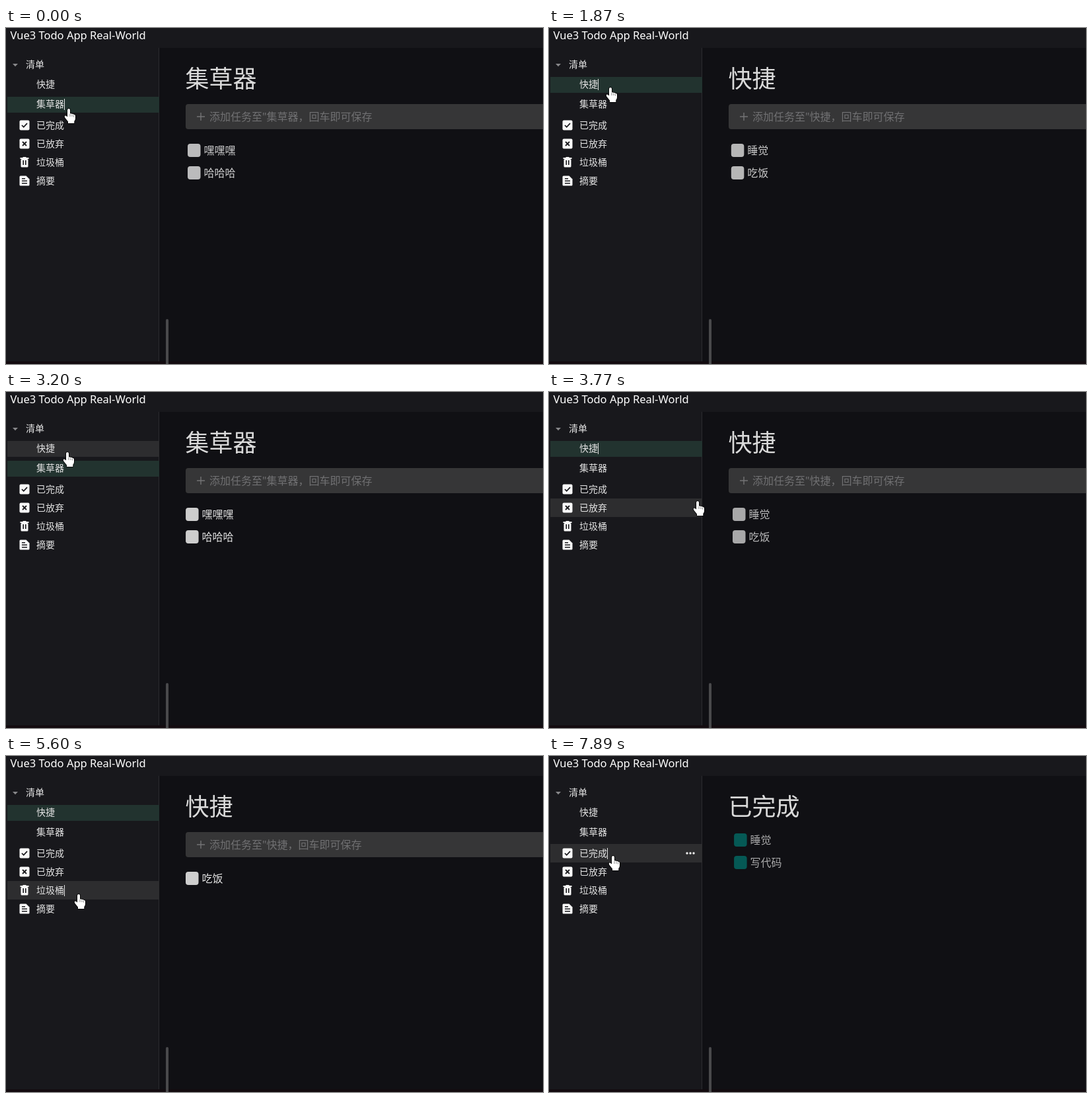
An HTML page with a canvas that plays this animation: 813x508 px, repeating every 8000 ms.

```html
<!DOCTYPE html>
<html lang="zh">
<head>
<meta charset="utf-8">
<title>Todo</title>
<style>
  html, body { margin: 0; width: 100%; height: 100%; overflow: hidden; background: #101014; }
  canvas { display: block; width: 813px; height: 508px; }
</style>
</head>
<body>
<canvas id="stage" width="813" height="508"></canvas>
<script>
const ctx = document.getElementById('stage').getContext('2d');
const FONT = '"Noto Sans", "Noto Sans CJK SC", "Noto Sans CJK", sans-serif';
const LOOP = 8000;
const REFRESH = 141.5, PHASE = 75;
const BLINK = 460;
const LOAD = 120;        // from a click to the new view
const TICKED = 4200;     // the first task is checked off

const lists = [
  { name: '快捷', tasks: ['睡觉', '吃饭'], input: true },
  { name: '集草器', tasks: ['嘿嘿嘿', '哈哈哈'], input: true }
].map((row, i) => ({ ...row, y: 85 + 30 * i, top: 74 + 30 * i, h: 24 }));

const tools = [
  { name: '已完成', tasks: ['睡觉', '写代码'], done: true, icon: checkIcon },
  { name: '已放弃', tasks: [], icon: crossIcon },
  { name: '垃圾桶', tasks: ['我是被删除的 task'], icon: binIcon },
  { name: '摘要', tasks: [], icon: noteIcon }
].map((row, i) => ({ ...row, y: 147 + 28 * i, top: 133 + 28 * i, h: 28 }));

const rows = [...lists, ...tools];
const [quick, inbox] = lists;
const [finished, , bin] = tools;

const clicks = [
  [-336, inbox], [1460, quick], [2502, inbox], [3484, quick], [5500, bin], [7616, finished]
];

// Resting places of the pointer: x, y, arrival, departure
const stops = [
  [95, 122, 0, 75], [93, 90, 700, 2490], [92, 115, 2615, 2900],
  [93, 85, 3300, 3600], [225, 165, 3750, 3770], [284, 182, 4060, 4300],
  [110, 209, 5020, 5900], [97, 184, 6300, 6900], [97, 151, 7500, LOOP]
];

const clamp = v => Math.max(0, Math.min(1, v));
const ease = p => p * p * (3 - 2 * p);
const lastClick = t => clicks.findLastIndex(c => c[0] <= t);

function pointer(t) {
  const i = stops.findLastIndex(s => s[2] <= t);
  const a = stops[i], b = stops[i + 1] || a;
  const p = b === a ? 0 : ease(clamp((t - a[3]) / (b[2] - a[3])));
  return [0, 1].map(k => Math.round(a[k] + (b[k] - a[k]) * p));
}

function currentView(t) {
  const i = lastClick(t - LOAD);
  const age = t - LOAD - clicks[i][0];
  const previous = clicks[i - 1]?.[1];
  const row = clicks[i][1];
  // The highlight leaves the old row before it reaches the new one
  const selected = age < 60 ? previous : age < 140 ? null : row;
  return { row, age, selected };
}

function rect(x, y, w, h, color, r = 0) {
  ctx.fillStyle = color;
  ctx.beginPath();
  ctx.roundRect(x, y, w, h, r);
  ctx.fill();
}

function text(str, x, midY, size, color, weight = 500) {
  ctx.font = `${weight} ${size}px ${FONT}`;
  ctx.fillStyle = color;
  ctx.fillText(str, x, Math.round(midY + size * 0.38));
}

function shape(d, fill) {
  ctx.fillStyle = fill;
  ctx.fill(new Path2D(d));
}

function line(d, color, width) {
  ctx.strokeStyle = color;
  ctx.lineWidth = width;
  ctx.stroke(new Path2D(d));
}

function at(x, y, draw) {
  ctx.save();
  ctx.translate(x, y);
  draw();
  ctx.restore();
}

const INK = '#18181c', WHITE = '#f8f8f8';

function checkIcon() {
  rect(-7.5, -7.5, 15, 15, WHITE, 2);
  line('M-4 0 L-1.3 2.8 L4 -2.8', INK, 1.8);
}

function crossIcon() {
  rect(-7.5, -7.5, 15, 15, WHITE, 2);
  line('M-3 -3 L3 3 M3 -3 L-3 3', INK, 1.8);
}

function binIcon() {
  shape('M-6.5 -7 H-3 L-2 -8 H2 L3 -7 H6.5 V-5 H-6.5 Z', WHITE);
  rect(-5.5, -5, 11, 12.5, WHITE, 1.5);
  line('M-1.8 -3 V4 M1.8 -3 V4', INK, 1.6);
}

function noteIcon() {
  shape('M-6 -7.5 H2.5 L7.5 -2.5 V6 Q7.5 7.5 6 7.5 H-6 Q-7.5 7.5 -7.5 6 V-6 Q-7.5 -7.5 -6 -7.5 Z', WHITE);
  line('M-4 -3.2 H1 M-4 0.3 H4 M-4 3.8 H4', INK, 1.6);
}

function sidebar(t, view) {
  const [x, y] = pointer(t);
  shape('M10 54 H18 L14 58.3 Z', '#88888b');
  text('清单', 30, 55, 14, '#e4e4e4');
  for (const row of rows) {
    const hovered = x < 232 && y >= row.top && y < row.top + row.h;
    if (row === view.selected) rect(2, row.top, 230, row.h, '#22332f');
    else if (hovered) rect(2, row.top, 230, row.h, '#2d2d2f');
    if (row.icon) at(28, row.y, row.icon);
    text(row.name, 46, row.y, 14, '#e4e4e4');
    if (row.icon && row === view.row)
      for (let k = 0; k < 3; k++) rect(207.3 + k * 5, row.y - 1.7, 3.4, 3.4, '#f0f0f0', 1.7);
  }
}

function caret(t) {
  const [since, row] = clicks[lastClick(t)];
  if (Math.floor((t - since) / BLINK) % 2 === 0)
    rect(46 + 14 * row.name.length, row.y - 8, 1, 17, '#e4e4e4');
}

function task(name, x, y, alpha, done) {
  ctx.globalAlpha = alpha;
  rect(x, y - 10, 19.5, 20, done ? '#01756e' : '#cecece', 4);
  text(name, x + 24.5, y, 16, '#e2e2e2');
  ctx.globalAlpha = 1;
}

function content(t, { row, age }) {
  text(row.name, 271.5, 76, 36, '#dadada', 400);
  if (row.input) {
    rect(272, 115, 560, 38, '#363637', 4);
    line('M289 134 H301 M295 128 V140', '#747476', 1.4);
    text(`添加任务至"${row.name}，回车即可保存`, 308, 134, 16, '#707072', 400);
  }
  // Tasks slide in from the right while fading in
  const shown = 1 - 0.97 * Math.exp(-age / 95);
  const x = 272 + 30 * (1 - shown);
  const top = row.input ? 185 : 127;
  const ticked = row === quick && t >= TICKED;
  const gone = ticked ? clamp((t - TICKED - 100) / 250) : 0;
  const lift = ticked ? ease(clamp((t - TICKED - 250) / 250)) : 0;
  row.tasks.forEach((name, i) => {
    const leaving = i === 0 ? gone : 0;
    const y = top + 34 * (i ? i - lift : 0);
    task(name, x + 30 * leaving, y, shown * (1 - leaving), row.done || (ticked && i === 0));
  });
}

function hand(t) {
  const outline = 'M-2 2 Q-2 0 0 0 Q2 0 2 2 V7.5 Q3.5 6.7 5 8 Q6.5 7.4 7.5 8.8 Q10 8.6 10 11 V15 ' +
    'Q10 17 8.3 19 V22 H-1 V19.5 L-5.8 13.5 Q-7 11.5 -5.6 10.6 Q-4.2 10 -2 12.6 Z';
  at(...pointer(t), () => {
    ctx.lineJoin = 'round';
    line(outline, '#000', 1.6);
    shape(outline, '#fff');
    line('M2 8 V12 M5 8.5 V12 M7.6 9.5 V12.5', '#555', 0.7);
  });
}

function draw(t) {
  const view = currentView(t);
  rect(0, 0, 813, 508, '#101014');
  rect(0, 0, 813, 30, '#18181c');
  rect(0, 30, 231, 478, '#18181c');
  rect(231, 30, 1, 478, '#2c2c30');
  text('Vue3 Todo App Real-World', 6.5, 11, 16.5, '#ffffff');
  sidebar(t, view);
  caret(t);
  content(t, view);
  rect(0, 504, 813, 4, '#130b0f');
  rect(242, 440, 4, 72, '#49494b', 2);
  hand(t);
}

function loop() {
  const t = performance.now() % LOOP;
  const held = PHASE + REFRESH * Math.floor((t - PHASE) / REFRESH);
  draw(Math.max(0, held));
  requestAnimationFrame(loop);
}
loop();
</script>
</body>
</html>
```
